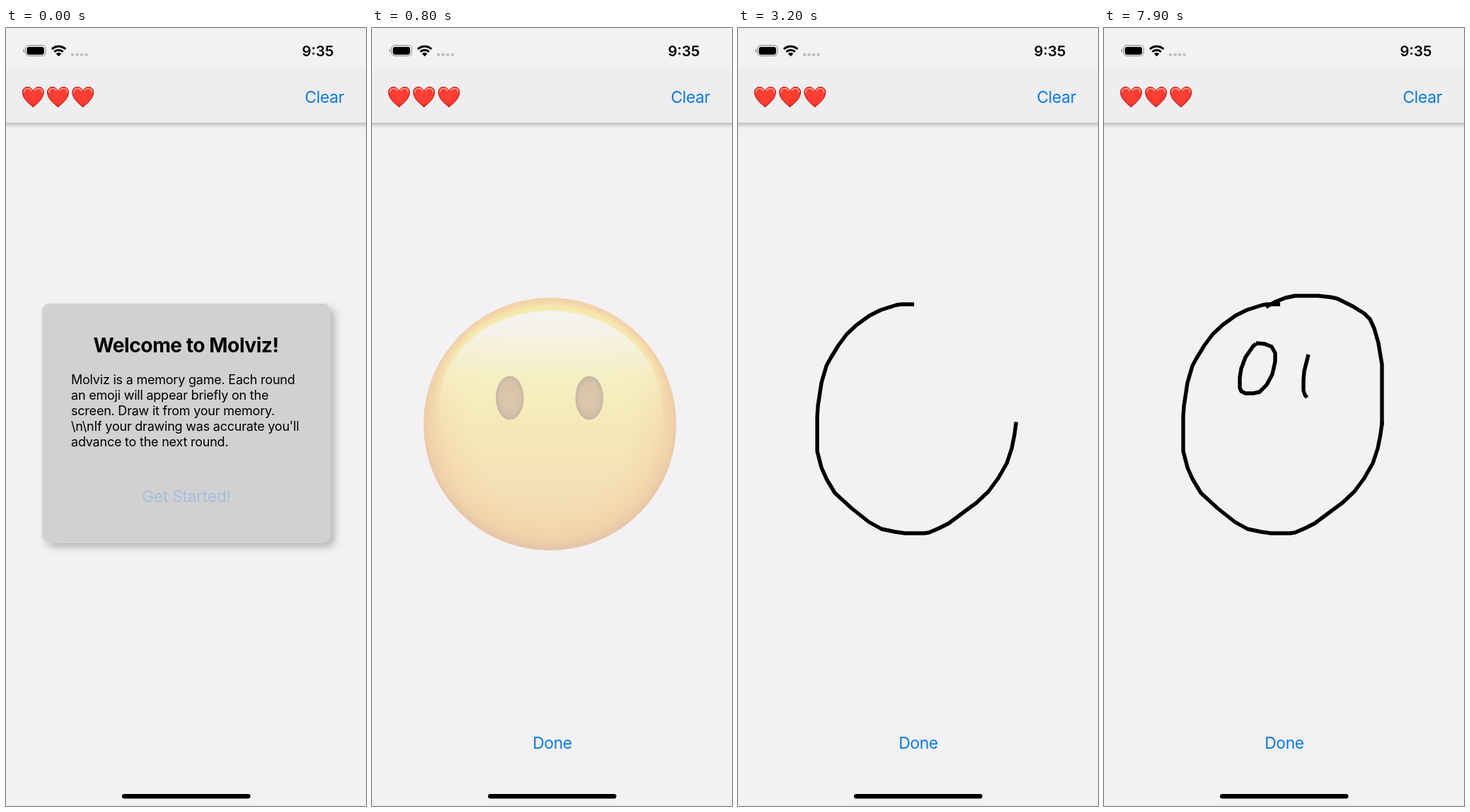
These frames come from a looping animation (509 by 1101 pixels, 8 s). An HTML page:

```html
<!DOCTYPE html>
<html lang="en">
<head>
<meta charset="utf-8">
<title>Memory drawing game</title>
<style>
  html, body { margin: 0; width: 100%; height: 100%; overflow: hidden; background: #f3f1f4; }
  svg { display: block; width: 100%; height: 100%; }
  text { font-family: Inter, "Liberation Sans", sans-serif; }
  .link { font-size: 22.8px; fill: #087ae6; letter-spacing: -.3px; text-anchor: middle; }
  #ink path { fill: none; stroke: #000; stroke-width: 5.4; stroke-linejoin: round; }
</style>
</head>
<body>
<svg viewBox="0 0 509 1101">
  <defs>
    <linearGradient id="headShade" x2="0" y2="1">
      <stop stop-color="#bdbbbe"/><stop offset=".4" stop-color="#d8d6d9"/><stop offset="1" stop-color="#f3f1f4"/>
    </linearGradient>
    <radialGradient id="heartFill" cx=".5" cy=".4" r=".65">
      <stop stop-color="#ff4033"/><stop offset=".65" stop-color="#fb3b30"/><stop offset="1" stop-color="#d3231b"/>
    </radialGradient>
    <linearGradient id="skin" x2="0" y2="1">
      <stop stop-color="#fbc02f"/><stop offset=".08" stop-color="#fdde36"/><stop offset=".3" stop-color="#fcec58"/>
      <stop offset=".48" stop-color="#fbdf4b"/><stop offset=".75" stop-color="#f9c556"/><stop offset="1" stop-color="#f0a638"/>
    </linearGradient>
    <radialGradient id="rim" cy=".48" r=".52">
      <stop offset=".62" stop-color="#fbb230" stop-opacity="0"/><stop offset=".8" stop-color="#f9ae2e" stop-opacity=".6"/>
      <stop offset=".92" stop-color="#ee9a2b" stop-opacity=".9"/><stop offset="1" stop-color="#c9782a"/>
    </radialGradient>
    <linearGradient id="glow" x2="0" y2="1">
      <stop stop-color="#fee134"/><stop offset=".2" stop-color="#fee23c" stop-opacity=".8"/>
      <stop offset=".5" stop-color="#fde04a" stop-opacity="0"/>
    </linearGradient>
    <linearGradient id="gloss" x2="0" y2="1">
      <stop stop-color="#fbf8ee"/><stop offset=".12" stop-color="#faf6d8" stop-opacity=".95"/>
      <stop offset=".3" stop-color="#fdf496" stop-opacity=".7"/><stop offset=".65" stop-color="#fce468" stop-opacity="0"/>
    </linearGradient>
    <radialGradient id="eyeFill">
      <stop stop-color="#b8832f"/><stop offset=".7" stop-color="#ae792c"/><stop offset="1" stop-color="#7d5524"/>
    </radialGradient>
    <filter id="soft"><feGaussianBlur stdDeviation="3"/></filter>
    <filter id="cardShade" x="-10%" y="-10%" width="125%" height="125%">
      <feDropShadow dx="6" dy="6" stdDeviation="6" flood-color="#000" flood-opacity=".26"/>
    </filter>
    <g id="heart">
      <path d="M0 14.5C-5 10-15 3-15-6.5C-15-11-12-14-8-14C-4-14-1.3-11.5 0-8C1.3-11.5 4-14 8-14C12-14 15-11 15-6.5C15 3 5 10 0 14.5Z"
            fill="url(#heartFill)" stroke="#a91d16" stroke-width=".9"/>
      <path d="M-12.8-6C-12.8-10-10.5-12-7.5-12S-3-10.5-1.8-8M2-8.5C3.5-11 5.5-12 8-12S12.8-10 12.8-6" fill="none" stroke="#ffa79c" stroke-width="1.4"/>
    </g>
    <g id="eye">
      <ellipse cy="1.5" rx="21.5" ry="32.5" fill="#ffec55" opacity=".6"/>
      <ellipse rx="19.8" ry="31" fill="url(#eyeFill)"/>
    </g>
  </defs>

  <rect width="509" height="1101" fill="#f3f1f4"/>
  <rect y="58" width="509" height="76" fill="#efedef"/>
  <rect y="134" width="509" height="8" fill="url(#headShade)"/>

  <!-- status bar -->
  <rect x="27.5" y="24.5" width="28.5" height="15" rx="4.5" fill="none" stroke="#858486"/>
  <rect x="29.5" y="26.8" width="24.3" height="11" rx="3"/>
  <path d="M25.8 29.5v5q-1.6-.5-1.6-2.5t1.6-2.5" fill="#858486"/>
  <g fill="none" stroke="#000" stroke-width="3">
    <path d="M64.8 29.9a13.8 13.8 0 0 1 19.4 0"/>
    <path d="M68.3 33.8a8.8 8.8 0 0 1 12.4 0"/>
  </g>
  <path d="M74.5 40.2l-3.7-3.8a5.2 5.2 0 0 1 7.4 0z"/>
  <path d="M92 37.7h24" stroke="#c2c0c4" stroke-width="4" stroke-dasharray="4 2.5"/>
  <text x="441" y="39.7" font-size="20.4" font-weight="600" text-anchor="middle">9:35</text>

  <use href="#heart" x="38.3" y="97.5"/>
  <use href="#heart" x="73.5" y="97.5"/>
  <use href="#heart" x="108.8" y="97.5"/>
  <text class="link" x="450.3" y="106">Clear</text>
  <rect x="164" y="1084" width="181.5" height="6.6" rx="3.3"/>

  <g id="intro">
    <rect x="51" y="390" width="407.5" height="338.5" rx="10" fill="#d2d0d1" filter="url(#cardShade)"/>
    <text x="254.5" y="458.5" font-size="28.2" font-weight="700" letter-spacing="-.5" text-anchor="middle">Welcome to Molviz!</text>
    <g id="rules" font-size="18" letter-spacing="-.22"></g>
    <text class="link" x="255" y="670.5" style="fill:#a2bfde">Get Started!</text>
  </g>

  <g id="game">
    <text class="link" x="255" y="1020">Done</text>
    <g id="face">
      <circle cx="251.5" cy="560.5" r="178.7" fill="url(#skin)"/>
      <circle cx="251.5" cy="560.5" r="178.7" fill="url(#rim)"/>
      <ellipse cx="252" cy="541" rx="165" ry="150" fill="url(#glow)" filter="url(#soft)"/>
      <ellipse cx="252" cy="537" rx="158" ry="137" fill="url(#gloss)"/>
      <use href="#eye" x="194.8" y="523.5"/>
      <use href="#eye" x="307.3" y="523.5"/>
    </g>
    <g id="ink"></g>
  </g>
</svg>
<script>
const LOOP = 8000, STEP = 100;
const $ = id => document.getElementById(id);

function add(parent, tag, attrs, text = "") {
  const node = document.createElementNS("http://www.w3.org/2000/svg", tag);
  for (const key in attrs) node.setAttribute(key, attrs[key]);
  node.textContent = text;
  return parent.appendChild(node);
}

[
  "Molviz is a memory game. Each round",
  "an emoji will appear briefly on the",
  "screen. Draw it from your memory.",
  "\\n\\nIf your drawing was accurate you'll",
  "advance to the next round."
].forEach((line, i) => add($("rules"), "text", { x: 92, y: 503.8 + i * 22 }, line));

// Each stroke is drawn between two times; pace > 1 slows it towards its end.
const strokes = [
  { from: 1700, to: 3200, pace: 1, d: "M249 391H231L224 392 202 399 186 407 168 420 154 433 142 449 131 467 125 478 118 502 113 535 112 550V599L118 622 125 638 137 658 161 680 185 699 203 709 222 713 236 715H263L270 714 284 708 298 701 322 683 337 672 354 656 368 637 380 616 387 595 391 575 393.3 557.5" },
  { from: 3200, to: 4200, pace: 1.4, d: "M393 562V476L388 446 382 425 376 412 368 404 352 394 330 383 321 381 303 379H270L256 382 241 388 229 395" },
  { from: 5150, to: 6500, pace: 1, d: "M215 447L211 450 200 466 194 482 192 495V509L194 514 200 517H211L220 515 230 505 238 490 242 472V460L237 451 227 447 215 446" },
  { from: 7400, to: 7900, pace: 1, d: "M289 462L283 486 282 499V513L284 519 287 523" }
].map(s => ({ ...s, node: add($("ink"), "path", { d: s.d, pathLength: 1 }) }));

const clamp = x => Math.min(1, Math.max(0, x));
const smooth = x => x * x * (3 - 2 * x);

function draw(t) {
  const playing = t >= 200;
  $("intro").style.display = playing ? "none" : "";
  $("game").style.display = playing ? "" : "none";
  $("face").style.opacity = 1 - smooth(clamp((t - 300) / 850));
  for (const { from, to, pace, node } of strokes) {
    const part = 1 - (1 - clamp((t - from) / (to - from))) ** pace;
    node.style.display = part > 0 ? "" : "none";
    node.setAttribute("stroke-dasharray", part < 1 ? `${part} 2` : "none");
  }
}

const start = performance.now();
function tick() {
  const t = (performance.now() - start) % LOOP;
  draw(Math.floor(t / STEP) * STEP);
  requestAnimationFrame(tick);
}
tick();
</script>
</body>
</html>
```
